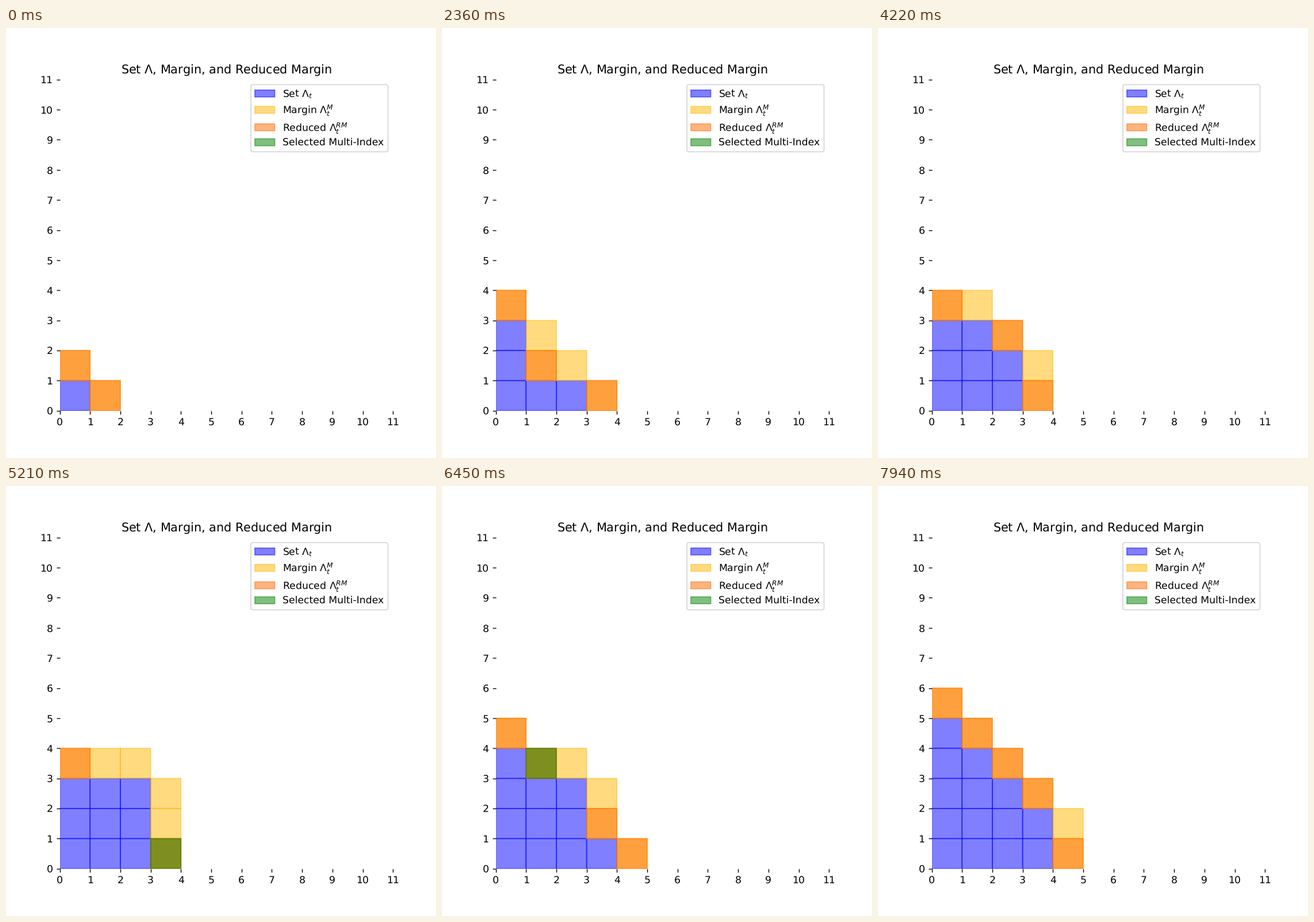
A matplotlib script for the animation above (8000 ms loop, 748x748 px).

```python
import matplotlib.pyplot as plt
from matplotlib.animation import FuncAnimation
from matplotlib.patches import Patch, Rectangle

SIZE_PX, SIZE_IN = 748, 6
LOOP_MS, INTERVAL = 8000, 20
STEP_MS, SELECT_MS, GROW_MS = 620, 250, 500
LIMIT = 11

BLUE, YELLOW, ORANGE, GREEN = "blue", "#ffb700", "#ff6800", "green"
ORDER = [(0, 1), (1, 0), (0, 2), (2, 0), (1, 1), (2, 1), (1, 2),
         (2, 2), (3, 0), (0, 3), (1, 3), (3, 1), (0, 4)]

plt.rcParams.update({"font.family": "DejaVu Sans", "text.hinting": "none"})
fig, ax = plt.subplots(figsize=(SIZE_IN, SIZE_IN), dpi=SIZE_PX / SIZE_IN)
ax.set(xlim=(0, LIMIT), ylim=(0, LIMIT),
       xticks=range(LIMIT + 1), yticks=range(LIMIT + 1))
ax.set_title(r"Set $\Lambda$, Margin, and Reduced Margin")
ax.spines[:].set_visible(False)
legend = ax.legend(loc="upper right", labelspacing=0.37, handles=[
    Patch(color=color, alpha=0.5, label=label) for color, label in [
        (BLUE, r"Set $\Lambda_t$"),
        (YELLOW, r"Margin $\Lambda_t^M$"),
        (ORANGE, r"Reduced $\Lambda_t^{RM}$"),
        (GREEN, "Selected Multi-Index")]])
for part in legend.findobj(Patch):
    part.set_snap(False)

state = {"key": None, "cells": []}


def margin_of(index_set):
    """Forward neighbours of the set that are not in it."""
    near = {n for x, y in index_set for n in ((x + 1, y), (x, y + 1))}
    return sorted(near - index_set)


def is_reduced(cell, index_set):
    """True if every backward neighbour of the cell is in the set."""
    x, y = cell
    return ((x == 0 or (x - 1, y) in index_set)
            and (y == 0 or (x, y - 1) in index_set))


def add_cells(cells, color):
    for cell in cells:
        patch = Rectangle(cell, 1, 1, color=color, alpha=0.5, snap=False)
        state["cells"].append(ax.add_patch(patch))


def show(count, selecting):
    for patch in state["cells"]:
        patch.remove()
    state["cells"] = []
    index_set = {(0, 0), *ORDER[:count]}
    margin = margin_of(index_set)
    add_cells(sorted(index_set), BLUE)
    add_cells(margin, YELLOW)
    add_cells([c for c in margin if is_reduced(c, index_set)], ORANGE)
    if selecting:
        add_cells([ORDER[count]], GREEN)


def update(frame):
    time = (frame + 0.5) * INTERVAL
    step, phase = divmod(time, STEP_MS)
    count = min(int(step) + (phase >= GROW_MS), len(ORDER))
    key = count, SELECT_MS <= phase < GROW_MS and count < len(ORDER)
    if key != state["key"]:
        show(*key)
        state["key"] = key
    return state["cells"]


def init():
    return update(0)


anim = FuncAnimation(fig, update, frames=LOOP_MS // INTERVAL, init_func=init,
                     interval=INTERVAL, repeat=True, repeat_delay=0)
plt.show()
```
